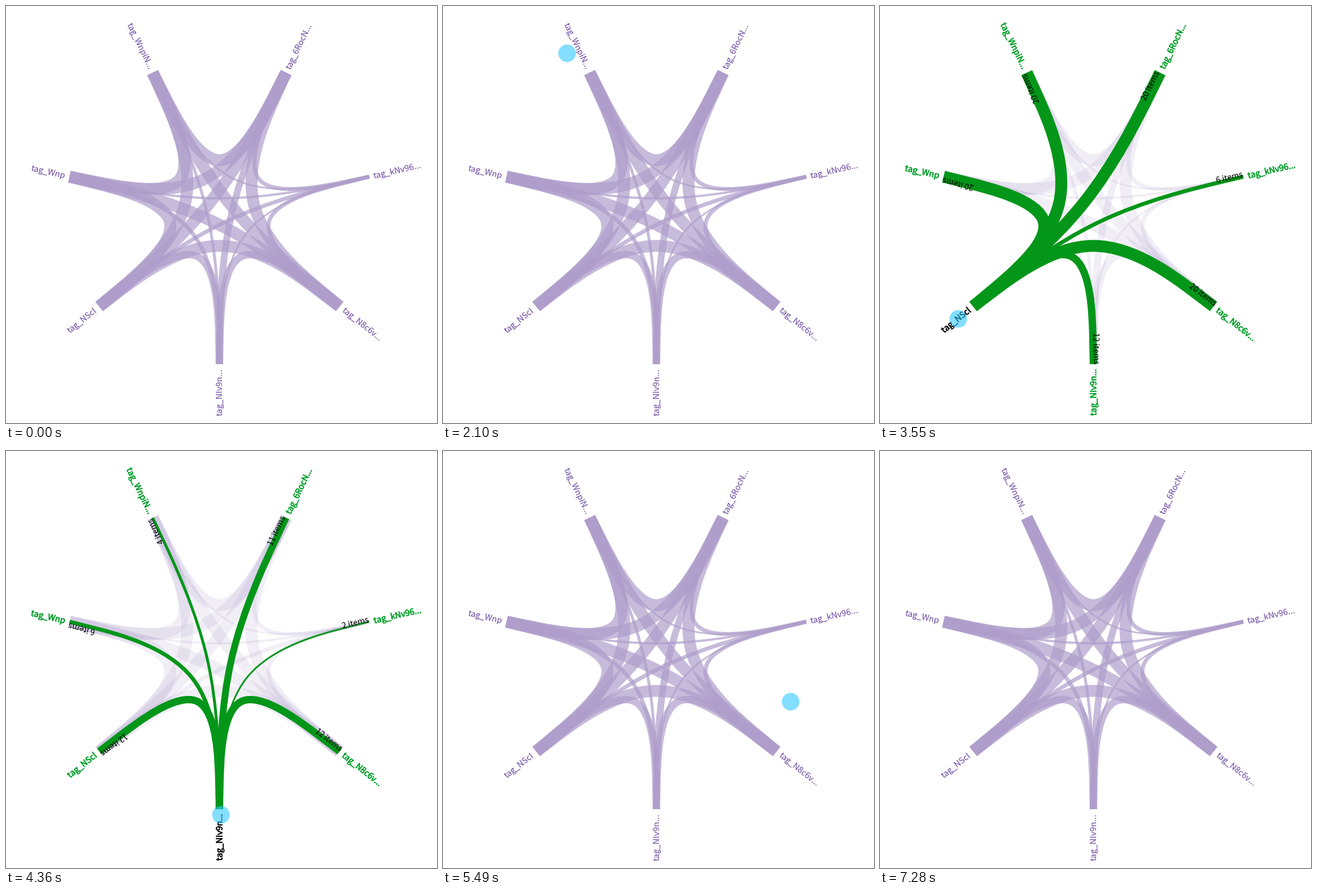
A matplotlib script that plays this animation: 760x737 px, repeating every 7.61 s.

```python
import itertools

import numpy as np
import matplotlib.pyplot as plt
from matplotlib import patheffects
from matplotlib.animation import FuncAnimation
from matplotlib.patches import Circle, PathPatch
from matplotlib.path import Path

W, H, DPI = 760, 737, 64
PT = 72 / DPI                      # points per pixel
LOOP, FRAMES = 7610, 190
STEP = LOOP / FRAMES
TICK = 160                         # the pointer jumps once per tick (ms)

CENTER = np.array([376.3, 362.0])
RADIUS, TENSION = 271, 0.95
FONT = "Noto Sans CJK JP"
LILAC, VIOLET, GREEN, LEAF = "#af9ecb", "#6b49a0", "#039619", "#03a02a"
SKY = (0.19, 0.79, 1.0, 0.6)

# Name, number of items, and how much of a smaller tag it shares
TAGS = [("6RocN...", 20, 0.92), ("kNv96...", 6, 1), ("N8c6v...", 20, 1),
        ("NIv9n...", 12, 0.33), ("NScl", 20, 1), ("Wnp", 20, 0.46),
        ("WnpiN...", 20, 0.33)]

# Pointer stops: ms, x, y
STOPS = np.array([
    (320, 420, 30), (1120, 260, 55), (1280, 234, 66), (1940, 234, 66),
    (2750, 157, 155), (3070, 90, 290), (3550, 138, 553), (3720, 138, 553),
    (4360, 379, 643), (5160, 612, 553), (5330, 612, 553), (5490, 613, 443),
    (6140, 499, 324), (6780, 515, 76)])
LEAVE = 7280

angles = (np.arange(len(TAGS)) + 0.5) * 360 / len(TAGS)   # clockwise from the top
rad = np.radians(angles)
rays = np.column_stack([np.sin(rad), -np.cos(rad)])
nodes = CENTER + RADIUS * rays


def waist(a, b):
    """Middle control point of a bundled link."""
    return TENSION * CENTER + (1 - TENSION) * (a + b) / 2


def bundle(a, b):
    """Cubic B-spline from a to b, pulled towards the centre."""
    m = waist(a, b)
    points = [a, (5 * a + m) / 6,
              (2 * a + m) / 3, (a + 2 * m) / 3, (a + 4 * m + b) / 6,
              (2 * m + b) / 3, (m + 2 * b) / 3, (m + 5 * b) / 6, b]
    codes = [Path.MOVETO, Path.LINETO] + [Path.CURVE4] * 6 + [Path.LINETO]
    return Path(points, codes)


def count(i, j):
    """Items that two tags have in common."""
    (_, small, _), (_, large, share) = sorted((TAGS[i], TAGS[j]), key=lambda tag: tag[1])
    return small if small == large else round(small * share)


fig = plt.figure(figsize=(W / DPI, H / DPI), dpi=DPI, facecolor="white")
ax = fig.add_axes([0, 0, 1, 1])
ax.set_xlim(0, W)
ax.set_ylim(H, 0)
ax.axis("off")

ax.plot([2, 750], [736.5, 736.5], color="#eeeeee", lw=PT, ls=(0, (1, 2)))

links = {}
for i, j in itertools.combinations(range(len(TAGS)), 2):
    links[i, j] = ax.add_patch(PathPatch(
        bundle(nodes[i], nodes[j]), fill=False, capstyle="butt",
        lw=(count(i, j) + 1) * PT))


def add_label(k):
    turn, side = 90 - angles[k], "left"
    if angles[k] > 179:
        turn, side = turn + 180, "right"
    t = np.radians(turn)
    x, y = nodes[k] + 8 * rays[k] + 5 * np.array([np.sin(t), np.cos(t)])
    return ax.text(x, y, "tag_" + TAGS[k][0], family=FONT, size=14.8 * PT,
                   rotation=turn, rotation_mode="anchor", ha=side,
                   va="baseline", zorder=4)


labels = [add_label(k) for k in range(len(TAGS))]
notes = [ax.text(*p, "", family=FONT, size=14.2 * PT, color="black",
                 rotation_mode="anchor", ha="right", va="baseline", zorder=5)
         for p in nodes]
pointer = ax.add_patch(Circle((0, 0), 15.5, fc=SKY, ec="none", zorder=6))


def style_label(label, color, strong):
    label.set_color(color)
    label.set_path_effects(
        [patheffects.withStroke(linewidth=0.7 * PT, foreground=color)] if strong else [])


def show_hover(tag):
    idle = tag is None
    for pair, link in links.items():
        lit = tag in pair
        link.set_edgecolor(GREEN if lit else LILAC)
        link.set_alpha(1 if lit else 0.7 if idle else 0.17)
        link.set_zorder(3 if lit else 2)
    for k, (label, note) in enumerate(zip(labels, notes)):
        style_label(label, VIOLET if idle else "black" if k == tag else LEAF, not idle)
        note.set_visible(not idle and k != tag)
        if note.get_visible():
            dx, dy = nodes[k] - waist(nodes[k], nodes[tag])
            note.set_text(f"{count(k, tag)} items")
            note.set_rotation(np.degrees(np.arctan2(-dy, dx)))


def pointer_at(t):
    """Position on the route, held until the next tick."""
    times, xs, ys = STOPS.T
    last = times[times <= t].max()
    t = last + (t - last) // TICK * TICK
    return np.array([np.interp(t, times, xs), np.interp(t, times, ys)])


def tag_under(point):
    """Tag whose label or node lies below the point."""
    x, y = point - CENTER
    for k, (dx, dy) in enumerate(rays):
        along, across = x * dx + y * dy, x * dy - y * dx
        if abs(across) < 14 and -10 < along - RADIUS < 95:
            return k
    return None


def draw(i):
    t = (i + 1) * STEP % LOOP
    present = STOPS[0, 0] <= t < LEAVE
    pointer.set_visible(present)
    if present:
        pointer.center = pointer_at(t)
    show_hover(tag_under(pointer.center) if present else None)
    return [*links.values(), *labels, *notes, pointer]


anim = FuncAnimation(fig, draw, frames=FRAMES, interval=STEP,
                     init_func=lambda: draw(0), repeat=True, repeat_delay=0)
plt.show()
```
